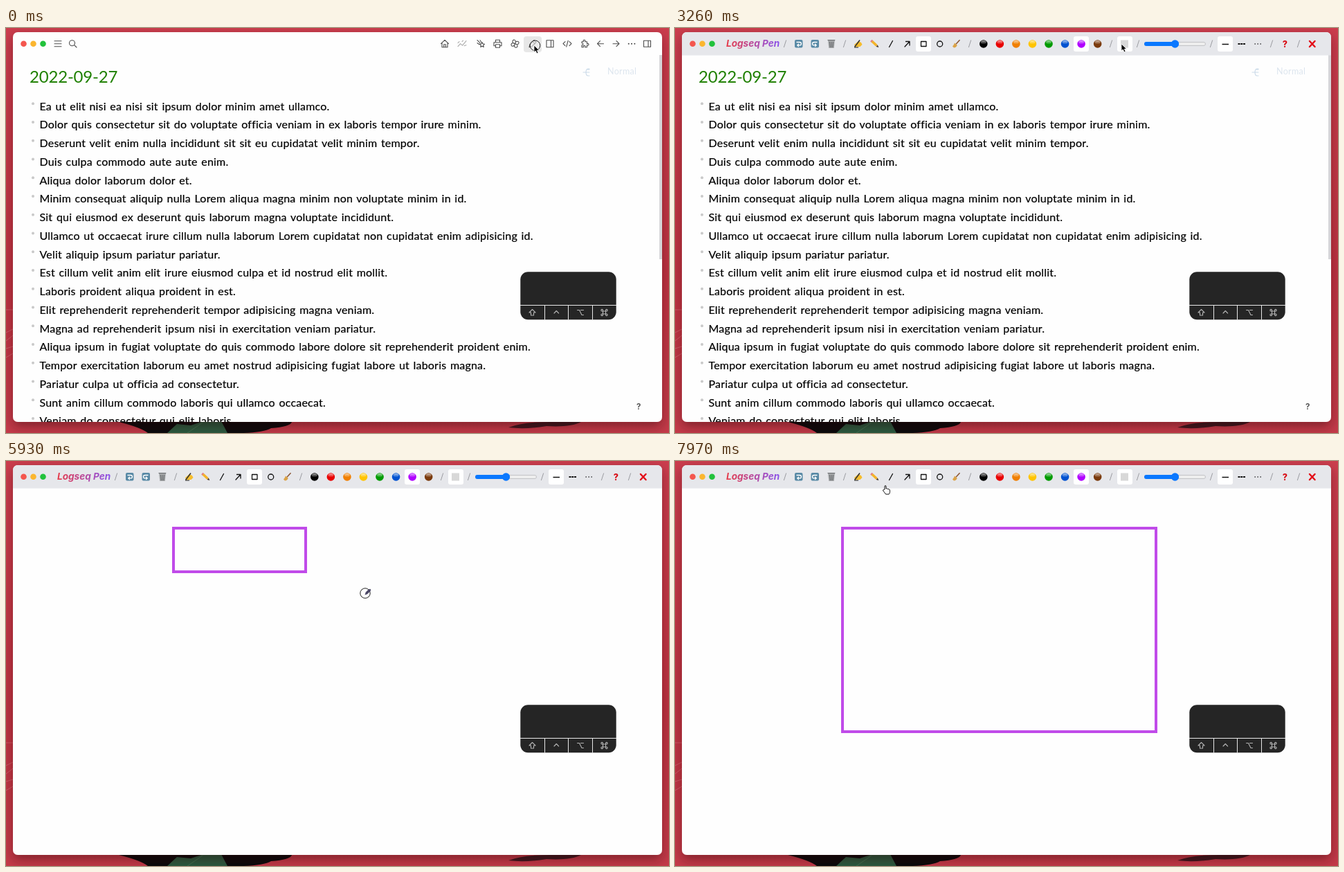
An HTML page for the animation above (8 s loop, 958x585 px).

```html
<!DOCTYPE html>
<html lang="en">
<head>
<meta charset="utf-8">
<title>Pen overlay</title>
<style>
html, body { margin: 0; width: 100%; height: 100%; overflow: hidden; background: #c53a49; }
svg { display: block; width: 100%; height: 100%; }
.line { fill: none; stroke-linecap: round; stroke-linejoin: round; }
#lines { font: 16px Lato, "Open Sans", sans-serif; letter-spacing: .2px; word-spacing: 1.3px; }
#lines text { stroke: #000; stroke-width: .2; }
</style>
</head>
<body>
<svg viewBox="0 0 958 585">
  <defs>
    <linearGradient id="wall" x2="0" y2="1">
      <stop stop-color="#cb3d4d"/><stop offset=".6" stop-color="#be3342"/><stop offset="1" stop-color="#c43a49"/>
    </linearGradient>
    <linearGradient id="brand">
      <stop stop-color="#e63a48"/><stop offset="1" stop-color="#8a55ee"/>
    </linearGradient>
    <linearGradient id="gloss" x2="0" y2="1">
      <stop stop-color="#fff" stop-opacity=".65"/><stop offset="1" stop-color="#fff" stop-opacity=".08"/>
    </linearGradient>
    <clipPath id="frame"><rect x="10" y="6" width="938" height="563" rx="7"/></clipPath>
    <filter id="shade" x="-5%" y="-5%" width="110%" height="112%">
      <feDropShadow dx="0" dy="7" stdDeviation="8" flood-color="#200" flood-opacity=".4"/>
    </filter>
  </defs>

  <!-- desktop -->
  <rect width="958" height="585" fill="url(#wall)"/>
  <path d="M0 407h10M0 440l10-5M0 452l10-8M0 463l10-3M0 476l10-6" stroke="#e0808a" stroke-width=".7" opacity=".7"/>
  <path d="M163 569h250q-2 7-30 9-10 6-40 7H205q-10-8-42-16z" fill="#0c0a0c"/>
  <path d="M233 585l14-13 20 2 18-6h26l9 17z" fill="#2c5a40"/>
  <path d="M262 585l22-15" stroke="#4b7a58" stroke-width=".7"/>
  <path d="M726 577q20-8 60-8h45q-15 8-50 6-30 5-55 2z" fill="#401820"/>
  <rect x="10" y="6" width="938" height="563" rx="7" fill="#fefefe" filter="url(#shade)"/>

  <g clip-path="url(#frame)">
    <g id="page">
      <text x="34" y="79" font-family="Lato, sans-serif" font-size="24" letter-spacing="-.2" fill="#1f8000">2022-09-27</text>
      <g id="lines"></g>
      <path class="line" d="M834 64h4m5-5h-2q-3 0-3 5t3 5h2m-5-5h5m-4-4h4" stroke="#ccdbe9" stroke-width="1.2"/>
      <text x="869" y="67" font-family="Lato, sans-serif" font-size="12.5" letter-spacing=".3" fill="#dce5ee">Normal</text>
      <text x="911" y="551" font-family="Inter, sans-serif" font-size="11.5" font-weight="700" fill="#555">?</text>
      <rect x="944" y="39" width="4" height="295" fill="#d6d6d9"/>
    </g>
    <g id="appBar">
      <rect x="748" y="12" width="26" height="23" rx="4" fill="#e7e7e7"/>
    </g>
    <g id="penBar">
      <rect x="10" y="6" width="938" height="33.5" fill="#e6e7eb"/>
      <text x="74" y="27.3" font-family="Inter, sans-serif" font-size="13.6" font-weight="700" font-style="italic" fill="url(#brand)">Logseq Pen</text>
      <g id="picked" fill="#fff"></g>
      <g fill="#598aa6">
        <rect x="173" y="17" width="11.5" height="11.5" rx="2"/>
        <rect x="196.5" y="17" width="11.5" height="11.5" rx="2"/>
      </g>
      <path class="line" d="M176 20.5h4q2.5 0 2.5 2.2t-2.5 2.2h-3m1.5-1.7l-1.8 1.7 1.8 1.7M205 20.5h-4q-2.5 0-2.5 2.2t2.5 2.2h3m-1.5-1.7l1.8 1.7-1.8 1.7" stroke="#fff" stroke-width="1.3"/>
      <path d="M221 18h10l-1.3 11h-7.4z" fill="#a4a6a8"/>
      <path d="M220.5 17.5h10.8M223.5 20l.7 8M226 20v8M228.5 20l-.7 8" stroke="#66696c"/>
      <path d="M259 24l6-5 4 2 1.5 3-3 3-7 .5z" fill="#f6bd2d"/>
      <path d="M259.5 27.5l7.5-10" stroke="#333" stroke-width="1.6"/>
      <path d="M259 28h6" stroke="#222"/>
      <path d="M284.5 19l7 6.5" stroke="#f3b32a" stroke-width="3.6"/>
      <path d="M283.3 18l1.5 1.3" stroke="#e27d86" stroke-width="3.6"/>
      <path d="M290.5 27l2.3-2.6 1.6 3.7z" fill="#4b3a2c"/>
      <path d="M411.5 17.3l-5.5 6" stroke="#8a5330" stroke-width="1.5"/>
      <path d="M404 21.5l3.8 3.5q-2 3.5-4.8 3.5l-2-2q2-2 3-5z" fill="#dba347"/>
      <path class="line" d="M309.5 27.5l5-9M332 27l7-7.5m-5.5 0h5.5v5.5M355.5 19.5h7.5v7h-7.5z" stroke="#111" stroke-width="1.3"/>
      <circle cx="382.7" cy="23" r="4" fill="none" stroke="#111" stroke-width="1.3"/>
      <g id="balls"></g>
      <rect x="644" y="17.5" width="11" height="11" fill="#d8d8d8"/>
      <rect x="678.5" y="20.5" width="88" height="5" rx="2.5" fill="#eee" stroke="#b9b9bd" stroke-width=".8"/>
      <rect x="678" y="20" width="45" height="6" rx="3" fill="#0a78ff"/>
      <circle cx="722.5" cy="23" r="5.7" fill="#0a78ff"/>
      <path d="M790.5 23.5h9.5" stroke="#111" stroke-width="1.3"/>
      <path d="M813.5 23h10.5" stroke="#111" stroke-width="2" stroke-dasharray="3 .8"/>
      <path d="M837.5 23h10" stroke="#222" stroke-width="1.3" stroke-dasharray="1.3 2.7"/>
      <text x="877.8" y="27.5" font-family="Inter, sans-serif" font-size="12.5" font-weight="800" fill="#d90d16">?</text>
      <path class="line" d="M917 19l7.5 8m0-8l-7.5 8" stroke="#e3101a" stroke-width="2.5"/>
    </g>
    <g id="lights"></g>
  </g>

  <!-- key display -->
  <rect x="743.3" y="352.3" width="138.4" height="69" rx="11" fill="#252525"/>
  <path d="M743 400.5h139M778.5 401v20.5M812.5 401v20.5M847.5 401v20.5" stroke="#e8e8e8"/>
  <g class="line" stroke="#b4b4b4" stroke-width="1.1">
    <path d="M760.5 406.5l4.5 4.5h-2.5v4h-4v-4h-2.5zM792 412l3.3-3.5 3.3 3.5M825.5 407.5h3l3.5 7h2.5m-4-7h4"/>
    <path d="M862.5 409h4v4h-4zm0 0h-1.3a1.3 1.3 0 1 1 1.3-1.3zm4 0v-1.3a1.3 1.3 0 1 1 1.3 1.3zm0 4h1.3a1.3 1.3 0 1 1-1.3 1.3zm-4 0v1.3a1.3 1.3 0 1 1-1.3-1.3z"/>
  </g>

  <rect id="box" x="242" y="97" fill="none" stroke="#c04be9" stroke-width="4"/>

  <g id="cursor">
    <circle id="ring" cx="1.5" cy=".3" r="7.3" fill="#eee" fill-opacity=".6" stroke="#222"/>
    <path id="arrow" d="M0 0v10l2.3-2 1.7 3.8 2-.9-1.7-3.6h3.2z" fill="#000" stroke="#fff" stroke-width=".8"/>
    <g id="pen">
      <circle r="7.2" fill="none" stroke="#222"/>
      <path d="M-.5 2.5l1.3-4 4-4 2.5-.8 1 1.5-1 2-4.2 4z" fill="#4b4767"/>
    </g>
    <path id="hand" d="M-2 0v-4q0-1.5 1-1.5t1 1.5v3q1.5-1 2 .5 1.5-.7 2 .5 1.5-.2 1.5 1.5v2q0 2-1.5 3.5h-4.5q-2-3-3.7-5-.8-1.3.4-1.6z" fill="#fff" stroke="#111" stroke-linejoin="round"/>
  </g>
</svg>
<script>
const $ = id => document.getElementById(id);
const add = (id, html) => $(id).insertAdjacentHTML('beforeend', html);
const show = (id, on) => $(id).style.display = on ? '' : 'none';

const lines = `Ea ut elit nisi ea nisi sit ipsum dolor minim amet ullamco.
Dolor quis consectetur sit do voluptate officia veniam in ex laboris tempor irure minim.
Deserunt velit enim nulla incididunt sit sit eu cupidatat velit minim tempor.
Duis culpa commodo aute aute enim.
Aliqua dolor laborum dolor et.
Minim consequat aliquip nulla Lorem aliqua magna minim non voluptate minim in id.
Sit qui eiusmod ex deserunt quis laborum magna voluptate incididunt.
Ullamco ut occaecat irure cillum nulla laborum Lorem cupidatat non cupidatat enim adipisicing id.
Velit aliquip ipsum pariatur pariatur.
Est cillum velit anim elit irure eiusmod culpa et id nostrud elit mollit.
Laboris proident aliqua proident in est.
Elit reprehenderit reprehenderit tempor adipisicing magna veniam.
Magna ad reprehenderit ipsum nisi in exercitation veniam pariatur.
Aliqua ipsum in fugiat voluptate do quis commodo labore dolore sit reprehenderit proident enim.
Tempor exercitation laborum eu amet nostrud adipisicing fugiat labore ut laboris magna.
Pariatur culpa ut officia ad consectetur.
Sunt anim cillum commodo laboris qui ullamco occaecat.
Veniam do consectetur qui elit laboris.`.split('\n');
lines.forEach((s, i) => {
  const y = 118.7 + i * 26.75;
  add('lines', `<circle cx="39" cy="${y - 9.5}" r="2" fill="#c9c9c9"/><text x="48.5" y="${y}">${s}</text>`);
});

['#f4564e', '#fbb62f', '#22c23c'].forEach((c, i) =>
  add('lights', `<circle cx="${25.5 + 14 * i}" cy="22.8" r="4.3" fill="${c}"/>`));

['#000', '#e80000', '#f07f00', '#ffc400', '#009a00', '#0052d0', '#b000ff', '#7a3a0c'].forEach((c, i) =>
  add('balls', `<g transform="translate(${445.8 + 23.55 * i} 23)"><circle r="5.8" fill="${c}"/>
    <ellipse cy="-2.5" rx="4" ry="2.6" fill="url(#gloss)"/></g>`));

[348, 576, 639, 784].forEach(x => add('picked', `<rect x="${x}" y="12" width="22" height="22" rx="3"/>`));
[159, 245, 426, 630, 669, 775, 862, 901].forEach(x =>
  add('penBar', `<path d="M${x - 1.7} 28l3.4-10.5" stroke="#9a9ba0"/>`));

// toolbar icons, drawn around their centres
const icons = [
  [75, 'M-5-4H5M-5 0H5M-5 4H5'],
  [96.5, 'M3-1a4 4 0 1 1-8 0a4 4 0 1 1 8 0M2.2 2L5.5 5.3'],
  [634, 'M-5.5 0L0-5.3 5.5 0M-4-1.5v6.5h8v-6.5M-1.3 5v-4h2.6v4'],
  [659, 'M-6 4l3.5-4 3 2.5L6-4M-6-1l2-2M0-3l1.5-1.5M3 3l3-1'],
  [686, 'M-5-5l4 4M-1-5l2 3M-5-1l3 2M2-2l1 2 2.5.5-1.8 1.8.5 2.5-2.2-1.2-2.2 1.2.4-2.5-1.7-1.8 2.5-.5z'],
  [710.5, 'M-3-2v-3.5h6v3.5M-3 3h-2.5v-5h11v5h-2.5M-3 1h6v4.5h-6z'],
  [735.5, 'M0 0C-5-1-4-6-1-5.5S1-2 0 0C1-5 6-4 5.5-1S2 1 0 0C5 1 4 6 1 5.5S-1 2 0 0C-1 5-6 4-5.5 1S-2-1 0 0'],
  [761, 'M-5 5l1-4 6-6 3 3-6 6zM0-3l3 3'],
  [786, 'M-5-5h10v10h-10zM1.5-5v10'],
  [811, 'M-3-3l-3 3 3 3M3-3l3 3-3 3M1.2-4.5l-2.4 9'],
  [836, 'M-4-3h2.5q-1-2.5 1-2.5t1 2.5h3v3q2.5-1 2.5 1t-2.5 1v3h-3q1-2.5-1-2.5t-1 2.5h-2.5v-3q2 0 2-1.5t-2-1.5z'],
  [859, 'M4.5 0h-9m4-4l-4 4 4 4'],
  [881.5, 'M-4.5 0h9m-4-4l4 4-4 4'],
  [904, 'M-4.3 0h.1M0 0h.1M4.3 0h.1'],
  [926.5, 'M-5-4.5h10v9h-10zM1.5-4.5v9']
];
icons.forEach(([x, d]) => add('appBar', `<path class="line" transform="translate(${x} 22.7)" d="${d}"
  stroke="${x === 659 ? '#aaa' : '#4c4c4c'}" stroke-width="${x === 904 ? 2 : 1.1}"/>`));

// pointer path: time, x, y
const path = [
  [0, 763, 25], [840, 763, 25], [930, 750, 52], [1020, 712, 108], [1110, 686, 129],
  [1200, 686, 129], [1290, 703, 118], [1470, 680, 66], [1650, 652, 32], [1830, 645, 23],
  [4840, 645, 23], [4930, 638, 50], [5110, 540, 170], [5290, 350, 243], [5390, 250, 195],
  [5480, 221, 120], [5570, 230, 97], [5660, 242, 97],
  [5750, 320, 118], [5840, 433, 160], [5930, 519, 191], [6110, 590, 243], [6290, 648, 302],
  [6400, 677, 339], [6490, 683, 354], [6570, 689, 368], [6750, 695, 386], [6840, 697, 391],
  [7700, 697, 391], [7790, 650, 320], [7880, 450, 150], [7970, 305, 41]
];
// bursts of pointer movement: start, end, steps
const bursts = [[930, 1110, 3], [1290, 1830, 7], [4930, 5660, 9], [5750, 6490, 9], [6570, 6840, 4], [7790, 7970, 3]];
const STEP = 90;

function snap(t) {
  const b = bursts.filter(b => b[0] <= t).pop();
  if (!b) return 0;
  const [from, to, steps] = b;
  return t >= to ? to : from + Math.min(steps - 2, Math.floor((t - from) / STEP)) * STEP;
}

function at(t) {
  const i = path.findIndex(p => p[0] > t);
  if (i < 0) return path[path.length - 1].slice(1);
  const [t0, x0, y0] = path[i - 1], [t1, x1, y1] = path[i], k = (t - t0) / (t1 - t0);
  return [x0 + (x1 - x0) * k, y0 + (y1 - y0) * k];
}

const within = (t, a, b) => t >= a && t < b;

function draw(t) {
  const moved = snap(t), [x, y] = at(moved);
  $('cursor').setAttribute('transform', `translate(${x} ${y})`);
  const hand = t >= 7970, pen = !hand && t >= 930 && y > 40;
  show('hand', hand);
  show('pen', pen);
  show('arrow', !hand && !pen);
  show('ring', t < 90 || within(t, 2100, 2520) || within(t, 3150, 3260) || within(t, 4340, 4450));

  $('penBar').style.opacity = t < 300 ? 0 : Math.min(1, (Math.floor((t - 300) / STEP) + 1) / 4);
  show('page', t < 2520 || within(t, 3260, 4450));

  // the rectangle trails the pointer by one step
  show('box', t >= 5750);
  const [bx, by] = t < 6840 ? at(Math.max(5660, moved - STEP)) : [695, 391];
  $('box').setAttribute('width', Math.max(0, bx - 242));
  $('box').setAttribute('height', Math.max(0, by - 97));
}

const start = performance.now();
(function tick() {
  draw((performance.now() - start) % 8000);
  requestAnimationFrame(tick);
})();
</script>
</body>
</html>
```
